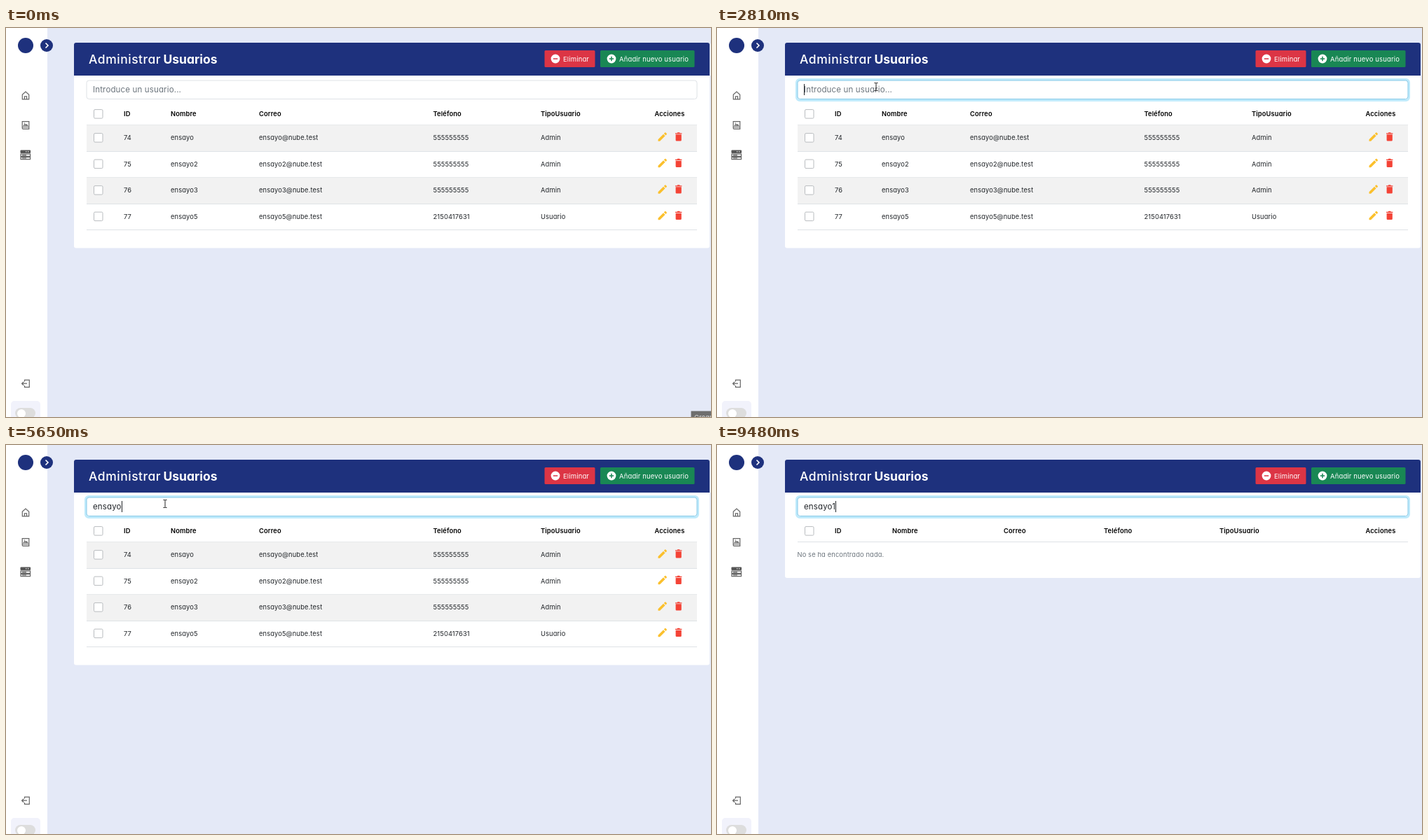
Recreate the animation shown at these times as an HTML page. Size 1006x556 px, loop 9610 ms.

```html
<!DOCTYPE html>
<html lang="es">
<head>
<meta charset="utf-8">
<style>
html, body { margin: 0; width: 100%; height: 100%; overflow: hidden; background: #e4e9f7; }
svg { display: block; }
text {
  font: 9.3px Inter, "Open Sans", sans-serif;
  font-feature-settings: "cv11";
  letter-spacing: .015em;
  fill: #212529;
  white-space: pre;
}
.head { font-weight: 600; fill: #000; }
.title { font-size: 17.5px; font-weight: 500; letter-spacing: .03em; fill: #fff; }
.strong { font-weight: 700; letter-spacing: 0; }
.button { font-size: 9.5px; fill: #fff; }
.field { font-size: 11.5px; letter-spacing: .013em; }
.muted { fill: #6c757d; }
.line { fill: none; stroke: #666; stroke-width: 1.2; }
</style>
</head>
<body>
<svg width="1006" height="556" viewBox="0 0 1006 556">
  <rect width="1006" height="556" fill="#e4e9f7"/>
  <rect width="59" height="556" fill="#fff"/>
  <circle cx="28" cy="25" r="11" fill="#1e317d"/>
  <circle cx="58" cy="25" r="9" fill="#1e317d"/>
  <path d="M56.5 21.5l3.5 3.5l-3.5 3.5" fill="none" stroke="#fff" stroke-width="1.6"/>

  <g class="line">
    <path d="M23.3 95.3L28 91l4.7 4.3v6.5h-9.4ZM26.4 101.8v-4h3.2v4"/>
    <path d="M23.2 133.6h9.6v10.8h-8.2q-1.4 0-1.4-1.4ZM23.2 142h9.6M25 140l2-2.5l1.5 1.5l1-1l1.5 2ZM26 136h1"/>
    <path d="M21 180.2h13.6v3.2H21ZM21 184.6h13.6v3H21ZM23 181.8h6M23 186h6"/>
    <path d="M26.5 505.5v-2.3h6.8v10.1h-6.8V511M30 508.2h-7.2M25.2 505.7l-2.6 2.5l2.6 2.5"/>
  </g>
  <rect x="20.5" y="174.5" width="14.6" height="4.5" rx="1" fill="#555"/>
  <path d="M28 176.8h1.5M31 176.8h1.5" stroke="#fff"/>
  <rect x="7" y="533" width="42" height="30" rx="5" fill="#f1f2fb"/>
  <rect x="13" y="543" width="29" height="15" rx="7.5" fill="#ddd"/>
  <circle cx="22" cy="551" r="6" fill="#fff"/>

  <rect id="card" x="97" y="21" width="907" rx="3" fill="#fff"/>
  <path d="M97 68V24q0-3 3-3h901q3 0 3 3v44Z" fill="#1e317d"/>
  <text class="title" x="118" y="51">Administrar</text>
  <text class="title strong" x="224.5" y="51">Usuarios</text>
  <rect x="768.5" y="32" width="72" height="24" rx="1.5" fill="#dc3545"/>
  <rect x="848" y="32" width="134.5" height="24" rx="1.5" fill="#198754"/>
  <g fill="#fff"><circle cx="784" cy="44" r="6.4"/><circle cx="864" cy="44" r="6.4"/></g>
  <path d="M780.8 44h6.4" stroke="#dc3545" stroke-width="1.5"/>
  <path d="M860.8 44h6.4M864 40.8v6.4" stroke="#198754" stroke-width="1.5"/>
  <text class="button" x="795" y="47.5">Eliminar</text>
  <text class="button" x="875" y="47.5">Añadir nuevo usuario</text>

  <rect id="glow" x="113.5" y="73.5" width="874" height="30" rx="4.5" fill="none" stroke="#bfeafb" stroke-width="3"/>
  <rect id="box" x="115" y="75" width="871" height="26.5" rx="3.5" fill="#fff"/>
  <text id="field" class="field" x="124" y="92"></text>
  <rect id="caret" y="80" width="1" height="16" fill="#212529"/>
  <g id="table"></g>
  <g id="tip">
    <rect x="977.5" y="547.5" width="30" height="10" fill="#6e6e6e"/>
    <text x="982" y="560" fill="#fff" style="fill:#ddd">Crear</text>
  </g>
  <path id="arrow" d="M0 0V13L3 10.2L5 15L7 14.2L5 9.5H9.2Z" fill="#fff" stroke="#000" stroke-width=".8"/>
  <path id="beam" d="M-2.5 -5.5h2l.5 .5l.5 -.5h2M0 -5V5M-2.5 5.5h2l.5 -.5l.5 .5h2" fill="none" stroke="#222"/>
</svg>
<script>
const LOOP = 9610;
const $ = id => document.getElementById(id);
const headings = ['ID', 'Nombre', 'Correo', 'Teléfono', 'TipoUsuario', 'Acciones'];
const wide = [168, 235, 361, 609.5, 763, 925.5];
const empty = [168, 250, 409, 552, 717, 925.5];
const users = [
  ['74', 'ensayo', '555555555', 'Admin'],
  ['75', 'ensayo2', '555555555', 'Admin'],
  ['76', 'ensayo3', '555555555', 'Admin'],
  ['77', 'ensayo5', '2150417631', 'Usuario']
].map(([id, name, phone, role]) => [id, name, name + '@nube.test', phone, role]);

// start time, typed text, query applied to the table
const typing = [
  [0, '', ''], [1410, '2', ''], [1480, '2', '2'], [2740, '', '2'], [2810, '', ''],
  [3470, 'e', ''], [3600, 'en', ''], [3730, 'ens', ''], [3860, 'ensa', ''], [3990, 'ensayo', ''],
  [4260, 'ensayo5', ''], [4330, 'ensayo5', 'ensayo5'],
  [5650, 'ensayo', ''], [5720, 'ensayo5', 'ensayo5'],
  [6530, 'ensayo', 'ensayo5'], [6600, 'ensayo2', 'ensayo2'],
  [7260, 'ensayo', 'ensayo2'], [7330, 'ensayo1', 'ensayo1']
];
// the caret flips at each time
const flips = [680, 1210, 1410, 1880, 2410, 3010, 3470, 4790, 5320, 6250, 6530,
  7130, 7260, 7860, 8390, 8920, 9480];

const label = (x, y, s, cls = '') => `<text class="${cls}" x="${x}" y="${y}">${s}</text>`;
const check = y => `<rect x="125.5" y="${y - 6.2}" width="12.5" height="12.5" rx="1.5" fill="#fff" stroke="#b9bcbf"/>`;
const rule = y => `<path d="M115 ${y}H986" stroke="#dee2e6"/>`;
const actions = y => `<g transform="translate(0 ${y})">
  <path d="M930.5 6.3V3.7L938 -3.8L940.6 -1.2L933.1 6.3ZM938.8 -4.6L940.2 -6Q940.8 -6.5 941.4 -6L942.8 -4.6Q943.3 -4 942.8 -3.4L941.4 -2Z" fill="#fbc02d"/>
  <path d="M955 -5.3h2.5l.8 -.9h2.8l.8 .9h2.5v1.4H955ZM955.6 -3.2h8.2V4.8q0 1.3 -1.3 1.3h-5.6q-1.3 0 -1.3 -1.3Z" fill="#f44336"/></g>`;

function drawTable(query) {
  const found = users.map((cells, i) => ({ cells, striped: i % 2 === 0 }))
    .filter(u => u.cells.join(' ').includes(query));
  const columns = found.length ? wide : empty;
  let out = check(122.8) + rule(138.5);
  headings.forEach((h, i) => out += label(columns[i], 126.2, h, 'head'));
  found.forEach(({ cells, striped }, i) => {
    const top = 138.5 + 37.5 * i;
    if (striped) out += `<rect x="115" y="${top}" width="871" height="37.5" fill="#f2f2f2"/>`;
    out += rule(Math.floor(top + 37.5) + .5) + check(top + 18.3) + actions(top + 17);
    cells.forEach((s, c) => out += label(wide[c], top + 21.8, s));
  });
  if (!found.length) out += label(114.5, 160.3, 'No se ha encontrado nada.', 'muted');
  $('table').innerHTML = out;
  $('card').setAttribute('height', found.length ? 143.5 + 37.5 * found.length : 169);
}

const show = (id, on) => $(id).setAttribute('visibility', on ? 'visible' : 'hidden');

function drawPointer(t) {
  const step = from => Math.min(1, (Math.floor((t - from) / 70) + 1) / 8);
  // 0 = over the field, 1 = below the stage
  let away = 1;
  if (t >= 70 && t < 8790) away = (1 - step(70)) ** 1.6;
  else if (t >= 8790) away = step(8790) ** 1.6;
  const x = 227 + 708 * away, y = 84 + 476 * away;
  const overField = y > 75 && y < 102;
  for (const id of ['arrow', 'beam']) $(id).setAttribute('transform', `translate(${x} ${y})`);
  show('beam', overField);
  show('arrow', !overField && away < 1);
}

let lastQuery = null;
function frame(now) {
  const t = now % LOOP;
  const [, text, query] = typing.findLast(s => s[0] <= t);
  const focused = t >= 680;
  if (query !== lastQuery) drawTable(lastQuery = query);

  const field = $('field');
  field.textContent = text || 'Introduce un usuario...';
  field.classList.toggle('muted', !text);
  $('caret').setAttribute('x', text ? Math.round(124 + field.getComputedTextLength()) : 124);
  show('caret', flips.filter(f => f <= t).length % 2);
  show('glow', focused);
  $('box').setAttribute('stroke', focused ? '#86c9e8' : '#dee2e6');
  show('tip', t < 70);
  drawPointer(t);
}

const origin = performance.now();
function tick() {
  frame(performance.now() - origin);
  requestAnimationFrame(tick);
}
tick();
</script>
</body>
</html>
```
